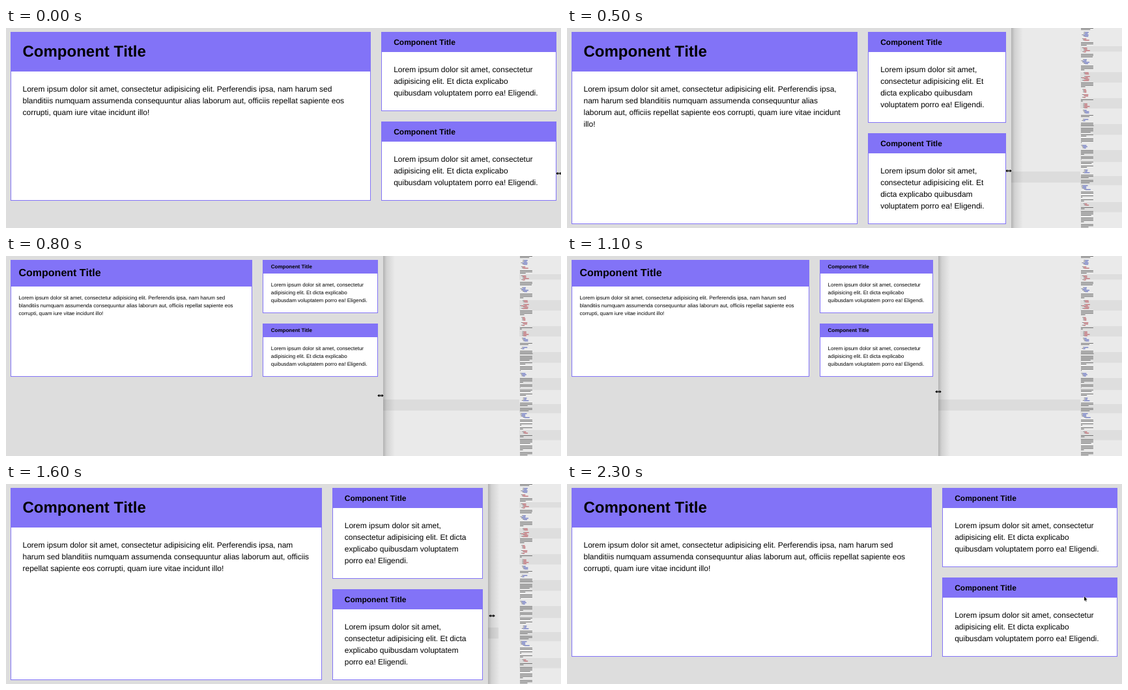
Write an HTML page with a canvas that moves like this. It is 852 px wide and 308 px high and loops after 2400 ms.

```html
<!DOCTYPE html>
<html lang="en">
<head>
<meta charset="utf-8">
<title>Responsive components</title>
<style>
  html, body { margin: 0; width: 100%; height: 100%; overflow: hidden; background: #ddd; }
  .stage { position: relative; width: 852px; height: 308px; overflow: hidden; }
  .page {
    position: absolute; left: 6.5px; top: 6px;
    display: grid; grid-template-columns: repeat(3, minmax(0, 1fr)); gap: 16px;
    font: 12px/1.5 "Liberation Sans", Arial, Helvetica, sans-serif;
    font-kerning: none; text-rendering: geometricPrecision; color: #000;
  }
  .page.small { font-size: 8px; }
  .card { border: 1px solid #8273f7; background: #fff; }
  .main { grid-column: span 2; grid-row: span 2; }
  h2 { margin: 0; padding: .5em 1.5em; font-size: 1em; background: #8273f7; }
  .main h2 { font-size: 2em; padding: .5em .75em; }
  p { margin: 0; padding: 1.5em; }
  canvas { position: absolute; left: 0; top: 0; }
</style>
</head>
<body>
<div class="stage">
  <div class="page">
    <section class="card main">
      <h2>Component Title</h2>
      <p>Lorem ipsum dolor sit amet, consectetur adipisicing elit. Perferendis ipsa, nam harum sed blanditiis numquam assumenda consequuntur alias laborum aut, officiis repellat sapiente eos corrupti, quam iure vitae incidunt illo!</p>
    </section>
    <section class="card">
      <h2>Component Title</h2>
      <p>Lorem ipsum dolor sit amet, consectetur adipisicing elit. Et dicta explicabo quibusdam voluptatem porro ea! Eligendi.</p>
    </section>
  </div>
  <canvas width="852" height="308"></canvas>
</div>
<script>
const W = 852, H = 308, LOOP = 2400, STEP = 100;
const LEFT = 6.5, WIDE = 845, NARROW = 562, BREAKPOINT = 590;
const GROW_START = 1244, GROW_END = 2212, RELEASE = 2000;
const MAP_X = 788, MAP_W = 21;

const page = document.querySelector(".page");
const ctx = document.querySelector("canvas").getContext("2d");
page.append(page.lastElementChild.cloneNode(true));

const clamp = v => Math.min(1, Math.max(0, v));
const lerp = (a, b, k) => a + (b - a) * k;

// Steady drag inwards, then an ease-out drag back
const growLeft = t => clamp((GROW_END - t) / (GROW_END - GROW_START));
function cardsRight(t) {
  return t < GROW_START
    ? Math.max(NARROW, WIDE - .342 * t)
    : WIDE - (WIDE - NARROW) * growLeft(t) ** 2;
}

function seeded(seed) {
  return () => (seed = (seed * 16807) % 2147483647) / 2147483647;
}

function box(color, x, y, w, h) {
  ctx.fillStyle = color;
  ctx.fillRect(x, y, w, h);
}

function drawMap() {
  const rand = seeded(4711);
  for (let y = 28; y < H; y += 40) box("#dedede", MAP_X, y, W - MAP_X, 8 + rand() * 12);
  const tints = ["#c47a80", "#7f88c8"];
  for (let y = 0; y < H; y += 2) {
    const prose = rand() < .6;
    const rows = 2 + Math.floor(rand() * 3);
    const tint = tints[Math.floor(rand() * 2)];
    for (let i = 0; i < rows; i++, y += 2) {
      if (prose) {
        box("#6f6f6f", MAP_X + 1, y, MAP_W * (i < rows - 1 ? .9 : rand()), 1);
      } else {
        const indent = MAP_X + 1 + rand() * 5;
        box("#8c8c8c", indent, y, 3, 1);
        box(tint, indent + 2, y, 3 + rand() * 6, 1.5);
      }
    }
  }
}

function drawPanel(edge, growing) {
  if (edge >= W) return;
  ctx.save();
  ctx.beginPath();
  ctx.rect(edge, 0, W - edge, H);
  ctx.clip();
  box("#eaeaea", edge, 0, W - edge, H);
  const bandEnd = growing ? Math.min(edge + 16, MAP_X) : MAP_X;
  if (edge < bandEnd) box("#dcdcdc", edge, 221, bandEnd - edge, 17);
  drawMap();
  const shade = ctx.createLinearGradient(edge, 0, edge + 18, 0);
  shade.addColorStop(0, "rgba(0,0,0,.24)");
  shade.addColorStop(.3, "rgba(0,0,0,.1)");
  shade.addColorStop(1, "rgba(0,0,0,0)");
  box(shade, edge, 0, 18, H);
  ctx.restore();
}

function shape(points, x, y) {
  ctx.beginPath();
  points.forEach(([px, py]) => ctx.lineTo(x + px, y + py));
  ctx.closePath();
  ctx.strokeStyle = "rgba(255,255,255,.7)";
  ctx.stroke();
  ctx.fillStyle = "#111";
  ctx.fill();
}

function drawArrow(t) {
  const k = (t - RELEASE) / (LOOP - STEP - RELEASE);
  const outline = [[-1, -3], [-1, 4], [.6, 2.6], [1.6, 5], [2.6, 4.5], [1.6, 2.2], [3.6, 2]];
  shape(outline, lerp(840, 795, k), lerp(203, 176, k));
}

function drawResize(t, edge, growing) {
  const x = Math.round(edge + (growing ? 10 * growLeft(t) : t < 1000 ? -4 : 0));
  const y = Math.round(213 + 11 * Math.cos(Math.PI * t / 1800));
  for (const side of [-1, 1]) {
    shape([[5 * side, 0], [2 * side, -2.2], [2 * side, 2.2]], x, y);
    box("#111", x + side - .5, y - 1.5, 1, 3);
  }
  box("#111", x - 3, y - .5, 6, 1);
}

function render(time) {
  const t = Math.floor(time % LOOP / STEP) * STEP;
  const right = cardsRight(t);
  const edge = Math.round(right + 8);
  const growing = t > GROW_START;
  page.style.width = right - LEFT + "px";
  page.classList.toggle("small", right < BREAKPOINT);
  ctx.clearRect(0, 0, W, H);
  drawPanel(edge, growing);
  if (t > RELEASE) drawArrow(t);
  else drawResize(t, edge, growing);
}

const start = performance.now();
function tick() {
  render(performance.now() - start);
  requestAnimationFrame(tick);
}
tick();
</script>
</body>
</html>
```
